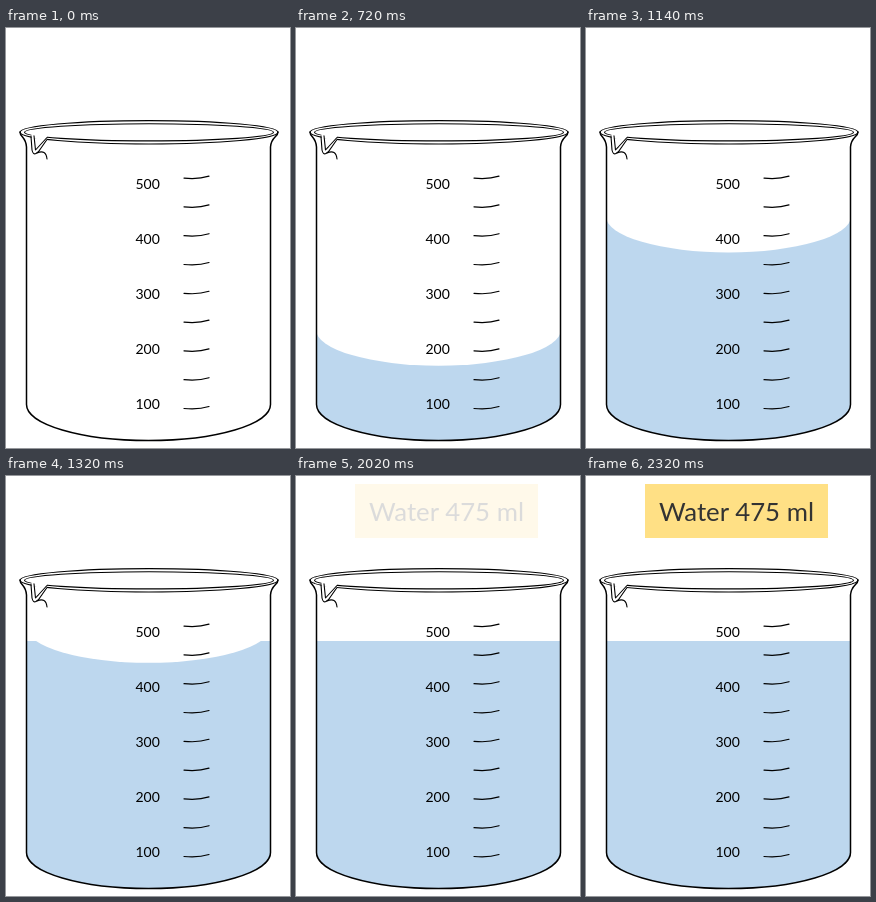
An HTML page that plays this animation: 284 px wide and 420 px high, repeating every 2.38 s.

```html
<!DOCTYPE html>
<html lang="en">
<head>
<meta charset="utf-8">
<title>Filling beaker</title>
<style>
  html, body { margin: 0; width: 100%; height: 100%; overflow: hidden; background: #fff; }
  svg { display: block; width: 284px; height: 420px; font-family: Lato, Carlito, sans-serif; }
  .line { fill: none; stroke: #000; stroke-linejoin: round; stroke-linecap: round; }
</style>
</head>
<body>
<svg viewBox="0 0 284 420">
  <path fill="#bdd7ee" d="M20.5 165H264.5V376.5A122 36 0 0 1 20.5 376.5Z"/>
  <path id="air" fill="#fff"/>
  <path class="line" stroke-width="1.5"
    d="M14 104C14 109 20 109 20.5 119V376.5A122 36 0 0 0 264.5 376.5V119C265 109 272 109 272 104"/>
  <g class="line" stroke-width="1.1">
    <ellipse cx="143" cy="104.3" rx="129" ry="11.7"/>
    <ellipse cx="143" cy="104.3" rx="124.5" ry="8.6"/>
    <path fill="#fff" stroke="none" d="M25.5 105L41 107V113L25.5 110Z"/>
    <path d="M25 108.6L26 122Q27 127 30 125.5Q33 124 34 121.5L41 111.5"/>
    <path d="M28 107.8L29.5 122L41 109.5"/>
    <path d="M31 125Q40 121 41 131"/>
  </g>
  <g id="scale"></g>
  <g id="label" opacity="0">
    <rect x="59" y="8" width="183" height="54" fill="#ffe085"/>
    <text x="150.5" y="45" font-size="25.8" text-anchor="middle" fill="#333">Water 475 ml</text>
  </g>
</svg>
<script>
const LOOP = 2380, STEP = 60, FULL = 1560, LABEL = 2020;
const $ = id => document.getElementById(id);
const repeat = (n, part) => Array.from({ length: n }, (_, i) => part(i)).join("");

$("scale").innerHTML =
  repeat(9, i => `<path class="line" stroke-width="1.2" d="M178 ${150.1 + 28.8 * i}q14 1.5 25 -2"/>`) +
  repeat(5, i => `<text x="129.5" y="${161 + 55 * i}" font-size="14">${500 - 100 * i}</text>`);

// lowest point of the surface: slow start, fastest halfway, cut off when full
function level(t) {
  if (t >= FULL) return 165;
  const u = t / 1840, turn = 2 * Math.PI;
  return 413 - 259 * (u - Math.sin(turn * u) / turn);
}

function draw(t) {
  const edge = level(Math.floor(t / STEP) * STEP) - 36;
  $("air").setAttribute("d", `M20 120V${edge}A122.5 36 0 0 0 265 ${edge}V120Z`);
  const fade = Math.floor((t - LABEL) / STEP) + 1;
  $("label").setAttribute("opacity", Math.max(0, Math.min(1, fade / 6)));
}

const start = performance.now();
function tick() {
  draw((performance.now() - start) % LOOP);
  requestAnimationFrame(tick);
}
tick();
</script>
</body>
</html>
```
